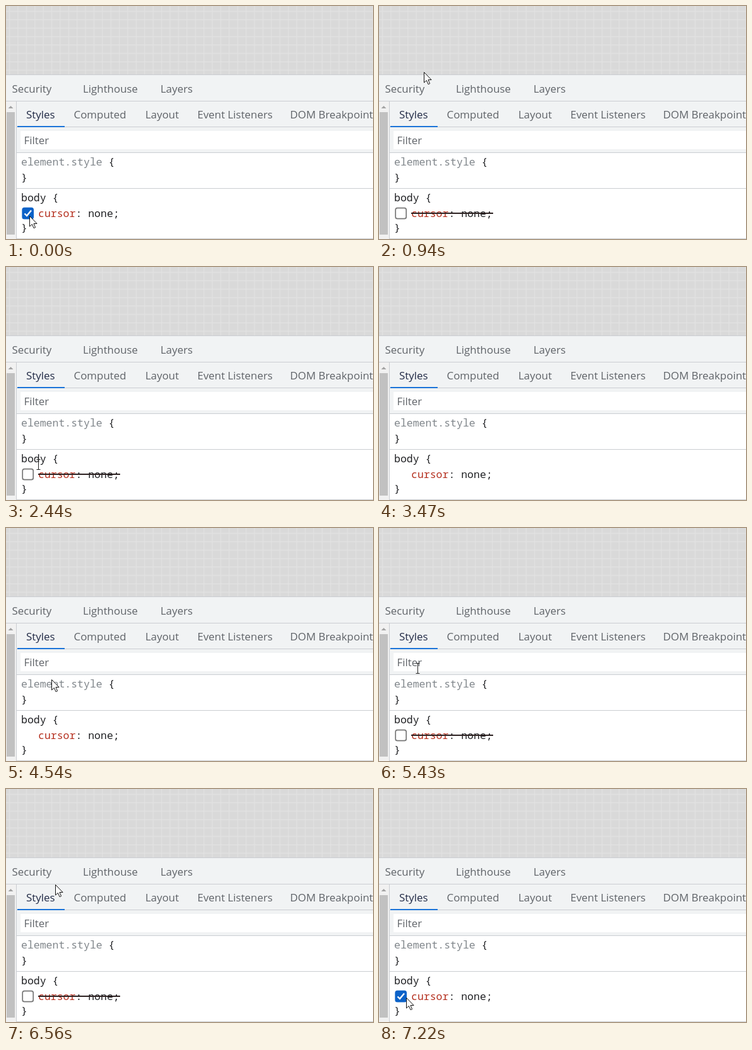
Recreate the animation shown at these times as an HTML page. Size 582 by 371 pixels, loop 7270 ms.

```html
<!DOCTYPE html>
<html lang="en">
<head>
<meta charset="utf-8">
<title>Toggling a cursor style</title>
<style>
  html, body { margin: 0; width: 100%; height: 100%; overflow: hidden; background: #fff; }
  svg { display: block; width: 582px; height: 371px; }
  text { font: 16.9px "Open Sans", "Noto Sans", sans-serif; fill: #5f6368; white-space: pre; }
  .active { fill: #202945; }
  .code text { font: 16.5px "Noto Sans Mono", "DejaVu Sans Mono", monospace; fill: #202124; }
  .code .dim { fill: #80868b; }
  .code .prop { fill: #b5301f; }
  .rule { fill: none; stroke: #cacdd1; }
  #frame { fill: #fff; stroke: #767676; stroke-width: 1.7; }
  .checked #frame { fill: #0b62c8; stroke: #0b62c8; }
  .checked #strike, svg:not(.checked) #tick { display: none; }
</style>
</head>
<body>
<svg id="stage" viewBox="0 0 582 371">
  <defs>
    <pattern id="grid" width="13.4" height="13.4" patternUnits="userSpaceOnUse">
      <path d="M5.5 0V13.4M0 8.5H13.4" stroke="#e3e3e3"/>
    </pattern>
  </defs>

  <rect width="582" height="109" fill="#d9d9d9"/>
  <rect width="582" height="109" fill="url(#grid)"/>
  <rect y="109" width="582" height="125" fill="#f1f3f4"/>
  <rect x="23" y="199" width="559" height="29" fill="#fff"/>

  <!-- scrollbar -->
  <rect y="152" width="16" height="219" fill="#f1f1f1"/>
  <rect x="1" y="169" width="13" height="195" fill="#c1c1c1"/>
  <path d="M3.5 163L7.5 159L11.5 163Z" fill="#a3a3a3"/>

  <path class="rule" d="M0 109.5H582M0 151.5H582M17 192.5H582M17 233.5H582M17 290.5H582M17 370.5H582M16.5 152V371"/>
  <rect x="18" y="191" width="75" height="2" fill="#1a73d8"/>

  <text x="9.5" y="138">Security</text>
  <text x="122" y="138">Lighthouse</text>
  <text x="245" y="138">Layers</text>
  <text x="32" y="179" class="active">Styles</text>
  <text x="107.5" y="179">Computed</text>
  <text x="221" y="179">Layout</text>
  <text x="303.5" y="179">Event Listeners</text>
  <text x="450.5" y="179">DOM Breakpoints</text>
  <text x="28.5" y="220">Filter</text>

  <g class="code">
    <text x="24" y="254"><tspan class="dim">element.style</tspan> {</text>
    <text x="24" y="279">}</text>
    <text x="24" y="311">body {</text>
    <text x="51" y="336"><tspan class="prop">cursor</tspan>: none;</text>
    <text x="24" y="359">}</text>
  </g>
  <path id="strike" d="M51 330H181" stroke="#2b2020" stroke-width="2"/>

  <g id="box">
    <rect id="frame" x="26.2" y="321.7" width="17" height="17" rx="3"/>
    <path id="tick" d="M29.5 330.5L33 334L40 325.5" fill="none" stroke="#fff" stroke-width="2.4"/>
  </g>

  <g id="pointer">
    <path id="arrow" d="M0 0V16.5L3.9 13L6.6 19.2L9.1 18.1L6.5 12H11.6Z" fill="#fff" stroke="#111" stroke-linejoin="round"/>
    <path id="beam" d="M-3 -8H3M0 -8V8M-3 8H3" fill="none" stroke="#222"/>
  </g>
</svg>
<script>
const LOOP = 7270;
const MOVE = 700; // longest time a move takes
const $ = id => document.getElementById(id);
const show = (id, on) => $(id).style.display = on ? "" : "none";

// Pointer stops: arrival time, x, y
const stops = [
  [0, 37, 334], [940, 71, 105], [1300, 90, 46], [2440, 51, 314], [2620, 38, 328],
  [3600, 75, 0], [4540, 72, 241], [4900, 38, 331], [5850, 95, 63], [7030, 43, 332],
];
const clicks = [140, 2700, 5030, 7130];

function pointerAt(t) {
  let [last, x, y] = stops[0];
  for (const [end, nx, ny] of stops.slice(1)) {
    const start = Math.max(last, end - MOVE);
    const k = Math.min(1, Math.max(0, (t - start) / (end - start)));
    x += (nx - x) * k;
    y += (ny - y) * k;
    last = end;
  }
  return [Math.round(x), Math.round(y)];
}

function draw(t) {
  const [x, y] = pointerAt(t);
  const checked = clicks.filter(c => c <= t).length % 2 === 0;
  const overFilter = y > 199 && y < 228;
  const overSelector = x < 64 && y > 297 && y < 317;
  const overText = overFilter || overSelector;

  $("stage").classList.toggle("checked", checked);
  show("box", !checked || y > 291);
  // The page itself hides the pointer while the declaration is active
  show("pointer", !checked || y > 109);
  show("arrow", !overText);
  show("beam", overText);
  $("pointer").setAttribute("transform", `translate(${x + .5} ${y + .5})`);
}

function tick() {
  draw(performance.now() % LOOP);
  requestAnimationFrame(tick);
}
tick();
</script>
</body>
</html>
```
